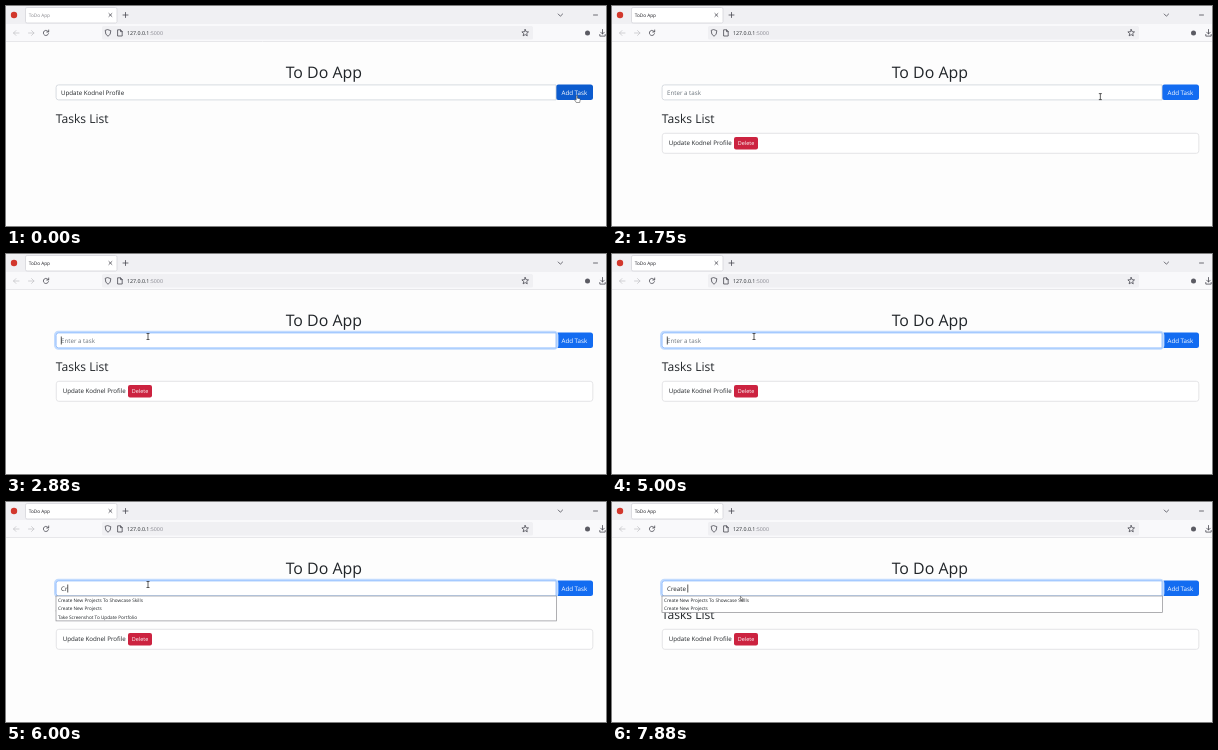
Write an HTML page that moves like this. It is 600x220 px and loops after 8000 ms.

```html
<!DOCTYPE html>
<html lang="en">
<head>
<meta charset="utf-8">
<title>To Do App</title>
<style>
  html, body { margin: 0; width: 100%; height: 100%; overflow: hidden; background: #fdfdfd; }
  svg { display: block; width: 600px; height: 220px; }
  text {
    font-family: "Open Sans", "Noto Sans", sans-serif;
    font-size: 6.2px; fill: #212529; white-space: pre;
    text-rendering: geometricPrecision;
  }
  .line { fill: none; stroke: #4a4a52; stroke-width: .8; stroke-linecap: round; stroke-linejoin: round; }
  .faint { stroke: #c6c6ca; }
  .small { font-size: 4.7px; }
  .white { fill: #fff; }
</style>
</head>
<body>
<svg viewBox="0 0 600 220">
  <!-- browser frame -->
  <rect width="600" height="18" fill="#f0f0f3"/>
  <rect y="18" width="600" height="17.5" fill="#f9f9fb"/>
  <path d="M0 35.5H600" stroke="#e3e3e6" stroke-width=".8"/>
  <circle cx="8" cy="9" r="3.2" fill="#d2372c"/>
  <rect x="19.5" y="1.5" width="91.5" height="15.5" rx="1.6" fill="#fff" stroke="#d5d5da" stroke-width=".8"/>
  <circle id="dot" cy="9" r="1" fill="#2f7fe0"/>
  <text id="tabTitle" class="small" y="10.9">ToDo App</text>
  <path class="line" d="M102.9 7.5l3 3m0-3l-3 3M117 9h5m-2.5-2.5v5M552.2 8l2.2 2.2L556.6 8M587.5 9h4"/>
  <path class="line faint" d="M13 27H7.5m2.4-2.4L7.5 27l2.4 2.4M22.500 27H28m-2.400-2.400L28 27l-2.400 2.400"/>
  <path id="reload" class="line" d="M42.300 25.700A2.600 2.600 0 1 0 42.500 27.700M42.700 24v2H40.700"/>
  <path id="stop" class="line" d="M37.700 24.700l4.400 4.400m0-4.400l-4.400 4.400"/>
  <rect x="96" y="20" width="431" height="13.500" rx="1.600" fill="#f0f0f3"/>
  <path class="line" d="M102 23.700L104.800 24.700Q105 28.700 102 30.300Q99 28.700 99.200 24.700Z"/>
  <path class="line" d="M112 23.800h2.600l1.600 1.600v4.600H112zM114.500 24v1.600h1.600"/>
  <text x="121" y="28.900" style="font-size:5.300px">127.0.0.1<tspan fill="#8a8a92">:5000</tspan></text>
  <path id="star" class="line"/>
  <circle cx="581.500" cy="27" r="2.500" fill="#5b5b63"/>
  <path class="line" d="M596.500 23.500v4.500m-1.800-1.800l1.800 1.800l1.800-1.800M593.800 28.500v1.600h5.400v-1.600"/>

  <!-- page -->
  <text x="279.700" y="72" style="font-size:15.900px">To Do App</text>
  <text x="49.700" y="117" style="font-size:12.100px">Tasks List</text>
  <rect id="button" x="550" y="78.500" width="37" height="15.500" rx="2.500"/>
  <text class="white" x="555.500" y="88.900">Add Task</text>
  <rect id="glow" x="49.200" y="78" width="502" height="16.500" rx="3.200" fill="none" stroke="#c2dbfe" stroke-width="2.400"/>
  <path id="field" d="M550 78.900H52.600a2.500 2.500 0 0 0-2.500 2.500v10a2.500 2.500 0 0 0 2.500 2.500H550z" fill="#fff" stroke-width=".8"/>
  <text id="entry" x="55" y="88.900"></text>
  <path id="caret" d="M0 82.500v8" stroke="#111" stroke-width=".7"/>
  <g id="item">
    <rect x="50.300" y="127.300" width="536.500" height="20" rx="2.500" fill="#fff" stroke="#dfdfe1" stroke-width=".8"/>
    <text x="56.700" y="139.100">Update Kodnel Profile</text>
    <rect x="122" y="131" width="24" height="12.500" rx="2" fill="#cc2340"/>
    <text class="white" x="125.800" y="139.400" style="font-size:5.450px">Delete</text>
  </g>
  <g id="menu">
    <rect id="menuBox" x="50" y="94" width="500.500" fill="#fff" stroke="#8d8d92" stroke-width=".7"/>
  </g>

  <!-- pointers -->
  <g stroke="#333" stroke-width=".5" stroke-linejoin="round">
    <path id="hand" fill="#fff" d="M-.800-3.500q.700-.600 1.200 0v2.700l2.300.500q.600.300.500 1.200l-.500 2.600H-.700L-2.400.900q.200-.800 1.600 0z"/>
    <path id="beam" fill="none" stroke-width=".8" d="M-1.500-3H1.500M0-3V3M-1.500 3H1.500"/>
    <path id="arrow" fill="#fff" d="M0 0V4.200L1 3.300L1.700 4.900L2.400 4.600L1.700 3.100H3z"/>
  </g>
</svg>
<script>
const LOOP = 8000, STEP = 125;
const el = id => document.getElementById(id);
const set = (id, attrs) => { for (const k in attrs) el(id).setAttribute(k, attrs[k]); };
const show = (id, on) => { el(id).style.display = on ? "" : "none"; };

// Last value whose start time has passed.
const at = (table, t) => table.reduce((v, [start, next]) => t >= start ? next : v, table[0][1]);

const WORD = "Create ";
const TYPED = [[0, 0], [5625, 1], [6000, 2], [6125, 3], [6250, 4], [6375, 5], [6500, 6], [6750, 7]];
const ROWS = [[0, 0], [5750, 2], [6000, 3], [6250, 2]];
const CARET = [[0, 0], [2875, 1], [3375, 0], [3875, 1], [4375, 0], [5000, 1],
               [5500, 0], [5625, 1], [7250, 0], [7750, 1]];
const FOCUS = [[0, 0], [2750, .5], [2875, 1]];
const TITLE = [[0, "#85858b"], [125, "#55555b"], [250, "#1c1c22"]];
const PATH = [[1500, 571, 93], [2375, 154, 81], [2625, 142, 82.5],
              [7625, 142, 82.5], [7750, 137, 88], [7875, 128.5, 94.3]];
const HINTS = ["Create New Projects To Showcase Skills", "Create New Projects",
               "Take Screenshot To Update Portfolio"];
const ROW_H = 8.3;

const hintRows = HINTS.map((label, i) => {
  const row = document.createElementNS("http://www.w3.org/2000/svg", "text");
  row.textContent = label;
  row.setAttribute("class", "small");
  row.setAttribute("x", 52);
  row.setAttribute("y", 99.9 + i * ROW_H);
  return el("menu").appendChild(row);
});

const starPoints = Array.from({ length: 10 }, (_, i) => {
  const r = i % 2 ? 1.6 : 3.5, a = (i / 5 - .5) * Math.PI;
  return (519.2 + r * Math.cos(a)).toFixed(2) + " " + (27 + r * Math.sin(a)).toFixed(2);
});
set("star", { d: "M" + starPoints.join("L") + "Z" });

function pointerAt(t) {
  if (t <= PATH[0][0]) return PATH[0].slice(1);
  const i = PATH.findIndex(p => p[0] >= t);
  if (i < 0) return PATH[PATH.length - 1].slice(1);
  const [t0, x0, y0] = PATH[i - 1], [t1, x1, y1] = PATH[i];
  const u = (t - t0) / (t1 - t0), e = u * u * (3 - 2 * u);
  return [x0 + (x1 - x0) * e, y0 + (y1 - y0) * e];
}

function drawPointer(t) {
  const [x, y] = pointerAt(t);
  const kind = x > 550 ? "hand" : t >= 7875 ? "arrow" : "beam";
  for (const id of ["hand", "beam", "arrow"]) show(id, id === kind);
  set(kind, { transform: `translate(${x} ${y})` });
  set("button", { fill: kind === "hand" ? "#0c5bce" : "#136cf1" });
}

function drawTab(t) {
  const loading = t >= 750 && t < 1500;
  show("dot", loading);
  show("stop", loading);
  show("reload", !loading);
  set("dot", { cx: 25.8 + 2.3 * Math.cos((t - 1375) / 1000 * 2 * Math.PI) });
  set("tabTitle", { x: loading ? 31 : 22.7 });
  el("tabTitle").style.fill = at(TITLE, t);
}

function drawForm(t) {
  const added = t >= 1500, focus = at(FOCUS, t), typed = WORD.slice(0, at(TYPED, t));
  const entry = el("entry");
  entry.textContent = !added ? "Update Kodnel Profile" : typed || "Enter a task";
  entry.style.fill = added && !typed ? "#6c757d" : "#212529";
  set("glow", { opacity: focus });
  set("field", { stroke: focus ? "#86b7fe" : "#ced4da" });
  show("item", added);
  show("caret", at(CARET, t));
  const end = typed ? entry.getComputedTextLength() : 0;
  set("caret", { transform: `translate(${55.3 + end} 0)` });

  const rows = at(ROWS, t);
  show("menu", rows);
  set("menuBox", { height: rows * ROW_H });
  hintRows.forEach((row, i) => { row.style.display = i < rows ? "" : "none"; });
}

const begin = performance.now();
function render() {
  const elapsed = (performance.now() - begin) % LOOP;
  const t = Math.floor(elapsed / STEP) * STEP;
  drawTab(t);
  drawForm(t);
  drawPointer(t);
  requestAnimationFrame(render);
}
render();
</script>
</body>
</html>
```
